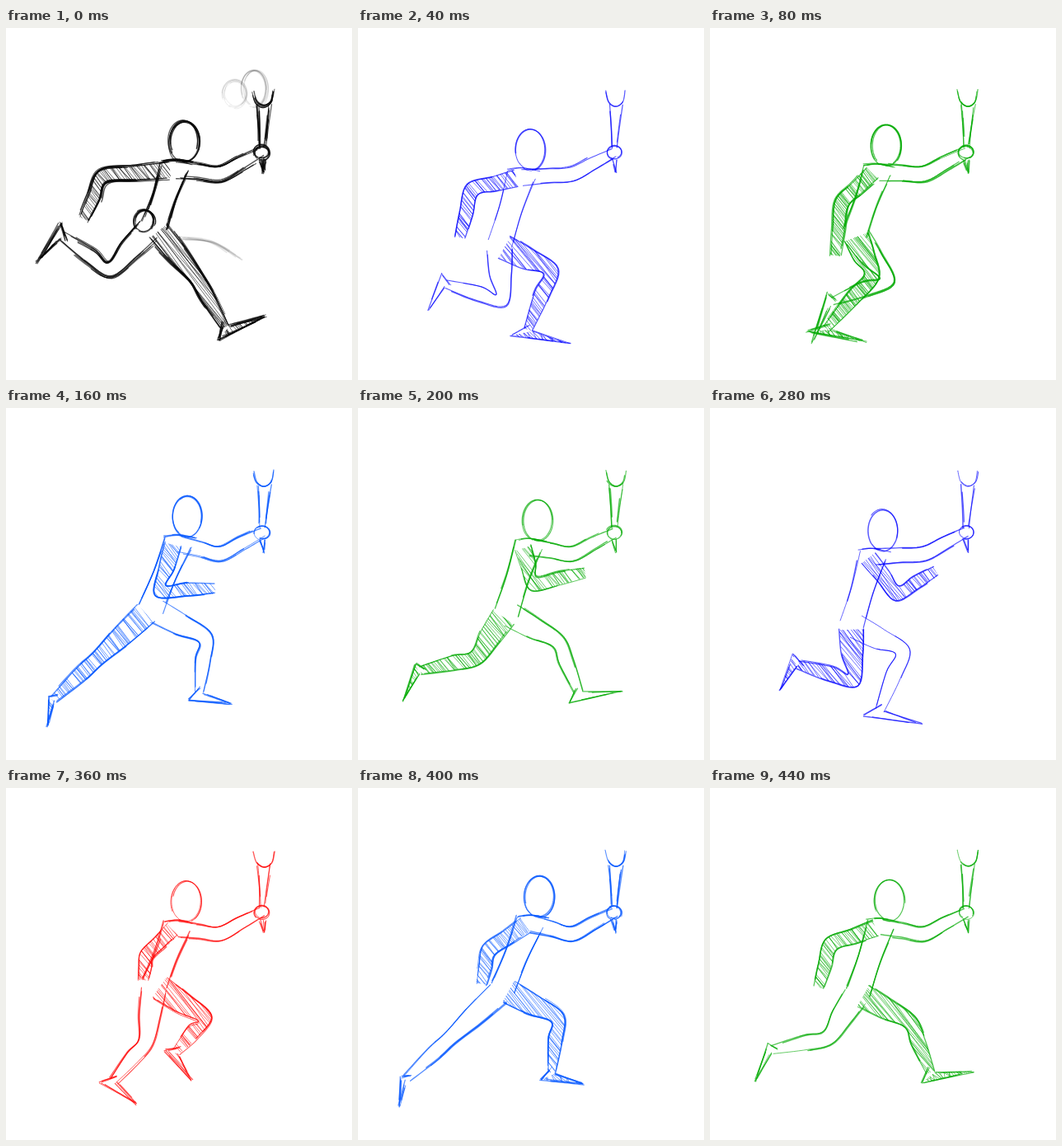
Animation, 420 px wide and 427 px high, one loop 480 ms. Source, as an HTML page with a canvas:

```html
<!DOCTYPE html>
<html lang="en">
<head>
<meta charset="utf-8">
<title>Torch runner</title>
<style>
  html, body { margin: 0; width: 100%; height: 100%; overflow: hidden; background: #fff; }
  canvas { display: block; }
</style>
</head>
<body>
<canvas id="strip"></canvas>
<script>
const W = 420, H = 427, STEP = 40, COUNT = 12, HALF = COUNT / 2;
const RED = '#ff0000', GREEN = '#00aa00';

// One stride. Each leg is knee, ankle, toe; the legs trade places on the next stride.
const stride = [
  { color: '#000000', passes: 8, rough: 2.2, gap: 2.3, shoulder: [205, 168], hip: [180, 240],
    land: [[231, 303], [266, 363], [315, 350]], swing: [[126, 293], [68, 253], [38, 284]] },
  { color: '#0000ff', passes: 2, rough: 1, gap: 2.4, shoulder: [198, 178], hip: [172, 262],
    land: [[234, 295], [206, 366], [257, 383]], swing: [[174, 330], [107, 311], [85, 342]] },
  { color: GREEN, passes: 4, rough: 1.5, gap: 1.6, shoulder: [203, 172], hip: [176, 248],
    land: [[196, 301], [141, 364], [190, 381]], swing: [[215, 306], [148, 332], [123, 382]] },
  { color: RED, passes: 3, rough: 1.6, gap: 2.6, shoulder: [208, 168], hip: [180, 238],
    land: [[170, 308], [131, 355], [159, 383]], swing: [[241, 280], [207, 319], [226, 355]] },
  { color: '#0055ff', passes: 4, rough: 1.3, gap: 2.5, shoulder: [209, 162], hip: [176, 243],
    land: [[112, 303], [59, 352], [50, 386]], swing: [[242, 279], [235, 345], [274, 359]] },
  { color: GREEN, passes: 3, rough: 1.1, gap: 2.2, shoulder: [207, 166], hip: [180, 248],
    land: [[143, 303], [76, 318], [55, 355]], swing: [[243, 284], [268, 345], [320, 344]] }
];

// Elbow and hand of the free arm; steps in between are interpolated.
const armKeys = [
  [0, [118, 180], [95, 232]], [2, [160, 212], [152, 276]], [4, [188, 222], [254, 219]],
  [6, [240, 204], [297, 180]], [7, [227, 225], [274, 198]], [9, [171, 203], [167, 233]],
  [11, [147, 190], [132, 242]]
];

const mix = (a, b, t) => a.map((v, i) => v + (b[i] - v) * t);
const move = (p, x, y) => [p[0] + x, p[1] + y];
const unit = (a, b) => {
  const d = Math.hypot(b[0] - a[0], b[1] - a[1]) || 1;
  return [(b[0] - a[0]) / d, (b[1] - a[1]) / d];
};

let seed = 1;
const random = () => (seed = seed * 16807 % 2147483647) / 2147483647;
const wobble = size => (random() * 2 - 1) * size;

const strip = document.getElementById('strip');
strip.width = W * COUNT;
strip.height = H;
const ctx = strip.getContext('2d');

function freeArm(step) {
  const n = armKeys.findIndex(key => key[0] >= step);
  const b = armKeys[n], a = armKeys[Math.max(0, n - 1)];
  const t = n ? (step - a[0]) / (b[0] - a[0]) : 1;
  return [mix(a[1], b[1], t), mix(a[2], b[2], t)];
}

// Catmull-Rom samples through the given points.
function smooth(pts, per = 8) {
  const at = i => pts[Math.max(0, Math.min(pts.length - 1, i))];
  const out = [pts[0]];
  for (let i = 0; i < pts.length - 1; i++) {
    const [a, b, c, d] = [-1, 0, 1, 2].map(k => at(i + k));
    for (let k = 1; k <= per; k++) {
      const t = k / per;
      out.push([0, 1].map(j => b[j] + .5 * t * (c[j] - a[j]
        + t * (2 * a[j] - 5 * b[j] + 4 * c[j] - d[j] + t * (3 * (b[j] - c[j]) + d[j] - a[j])))));
    }
  }
  return out;
}

function path(pts) {
  ctx.beginPath();
  pts.forEach(p => ctx.lineTo(...p));
}

// Overlapping loose strokes, each covering most of the curve.
function sketch(pts, { passes, rough }, alpha = .65) {
  const curve = smooth(pts);
  for (let n = 0; n < passes; n++) {
    const first = n ? Math.floor(random() * curve.length * .35) : 0;
    const last = n ? Math.ceil(curve.length * (1 - random() * .35)) : curve.length;
    const from = [wobble(rough), wobble(rough)], to = [wobble(rough), wobble(rough)];
    path(curve.slice(first, last).map((p, i) => move(p, ...mix(from, to, i / (last - first)))));
    ctx.globalAlpha = alpha;
    ctx.lineWidth = .9 + random() * .6;
    ctx.stroke();
  }
}

function hatch(pts, { gap }) {
  const xs = pts.map(p => p[0]), ys = pts.map(p => p[1]);
  const top = Math.min(...ys), bottom = Math.max(...ys), tall = bottom - top;
  ctx.save();
  path(pts);
  ctx.clip();
  ctx.globalAlpha = .55;
  ctx.lineWidth = 1;
  for (let x = Math.min(...xs) - tall; x < Math.max(...xs); x += gap * (.6 + random() * .8)) {
    path([[x + wobble(4), top], [x + tall * .8 + wobble(10), bottom]]);
    ctx.stroke();
  }
  ctx.restore();
}

// Two contours at given half-widths around a chain of points.
function limb(chain, widths, style, shaded) {
  const side = sign => chain.map((p, i) => {
    const [x, y] = unit(chain[Math.max(0, i - 1)], chain[Math.min(chain.length - 1, i + 1)]);
    return move(p, -y * widths[i] * sign, x * widths[i] * sign);
  });
  const left = side(1), right = side(-1);
  if (shaded) hatch([...smooth(left), ...smooth(right).reverse()], style);
  sketch(left, style);
  sketch(right, style);
}

function leg(hip, [knee, ankle, toe], style, shaded) {
  const chain = [mix(hip, knee, .1), mix(hip, knee, .55), knee, mix(knee, ankle, .4), ankle];
  limb(chain, [15, 13, 9, 9, 5], style, shaded);
  const [x, y] = unit(knee, ankle);
  const heel = move(mix(ankle, toe, -.3), x * 13, y * 13);
  const sole = [heel, mix(heel, toe, .5), toe];
  const instep = [toe, mix(ankle, toe, .5), mix(ankle, toe, .1)];
  if (shaded) hatch([...sole, ...instep], style);
  sketch(sole, style);
  sketch(instep, style);
  sketch([move(ankle, -x * 6, -y * 6), heel], style);
}

function arm(shoulder, elbow, hand, style, shaded) {
  const chain = [shoulder, mix(shoulder, elbow, .5), elbow, mix(elbow, hand, .5), hand];
  limb(chain, [10, 9, 9, 8, 6], style, shaded);
}

function oval([x, y], rx, ry, style, alpha) {
  const ring = Array.from({ length: 13 }, (_, i) => {
    const a = i * Math.PI / 6 + 2;
    return [x + rx * Math.cos(a), y + ry * Math.sin(a)];
  });
  sketch(ring, style, alpha);
}

function torch([x, y], style) {
  for (const s of [-1, 1]) {
    sketch([[x + 2 + s * 8, y - 58], [x + 1 + s * 5, y - 30], [x + s * 3, y - 6]], style);
    sketch([[x + s * 3, y + 9], [x + 2, y + 24]], style);
  }
  sketch([-12, -8, 1, 10, 13].map((dx, i) => [x + 1 + dx, y - 75 + 19 * Math.sin(i * Math.PI / 4)]), style);
  oval([x, y], 9, 8, style);
}

// Loose construction marks on the two landing poses.
const marks = {
  0(style) {
    oval([168, 234], 12, 13, style);
    oval([302, 74], 15, 22, style, .1);
    oval([278, 80], 14, 16, style, .08);
    sketch([[213, 255], [250, 260], [285, 281]], style, .1);
  },
  6(style) {
    ctx.strokeStyle = RED;
    sketch([[196, 159], [220, 162]], { ...style, passes: 2 });
  }
};

function draw(step) {
  const pose = stride[step % HALF], { shoulder, hip } = pose;
  const landFar = step < HALF;
  const hand = [311, 151];
  ctx.strokeStyle = pose.color;
  arm(move(shoulder, -6, 4), ...freeArm(step), pose, true);
  leg(hip, pose.land, pose, landFar);
  leg(hip, pose.swing, pose, !landFar);
  limb([shoulder, mix(shoulder, hip, .5), hip], [17, 14, 15], pose);
  arm(move(shoulder, 2, 3), [260, 177], hand, pose);
  sketch([move(shoulder, -17, -6), move(shoulder, 0, -8), move(shoulder, 22, -4)], pose);
  oval(move(shoulder, 11, -30), 18, 25, pose);
  torch(hand, pose);
  if (marks[step]) marks[step](pose);
}

ctx.lineCap = ctx.lineJoin = 'round';
for (let step = 0; step < COUNT; step++) {
  seed = 977 + step * 131;
  ctx.save();
  ctx.translate(step * W, 0);
  draw(step);
  ctx.restore();
}

strip.animate(
  [{ transform: 'translateX(0)' }, { transform: `translateX(${-strip.width}px)` }],
  { duration: STEP * COUNT, iterations: Infinity, easing: `steps(${COUNT})`, delay: -.5 }
);
</script>
</body>
</html>
```
